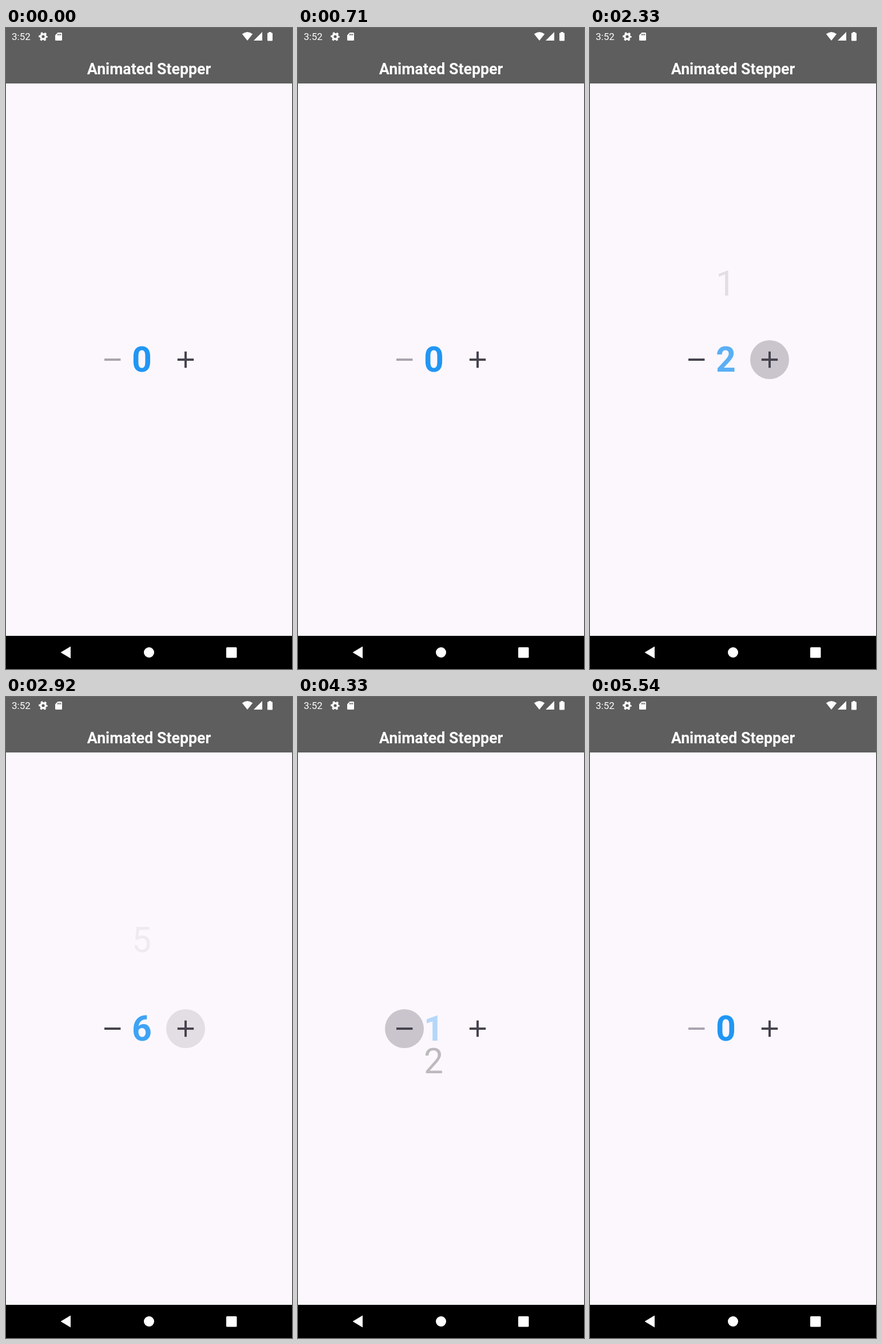
Recreate the animation shown at these times as an HTML page. Size 500x1121 px, loop 5.62 s.

```html
<!DOCTYPE html>
<html lang="en">
<head>
<meta charset="utf-8">
<title>Animated Stepper</title>
<style>
  html, body { margin: 0; width: 100%; height: 100%; overflow: hidden; background: #fcf7fd; }
  svg { display: block; font-family: Roboto, sans-serif; }
  .digit { font-size: 60.8px; }
  #next { font-weight: 700; fill: #2196f3; }
  #prev { fill: #9e9e9e; }
  .ink { fill: #49454f; opacity: 0; }
  .icon { fill: none; stroke: #47444f; stroke-width: 4; }
</style>
</head>
<body>
<svg width="500" height="1121" viewBox="0 0 500 1121">
  <rect width="500" height="1121" fill="#fcf7fd"/>
  <rect width="500" height="97" fill="#5e5e5e"/>

  <!-- status bar -->
  <g fill="#fff">
    <text x="10" y="21" font-size="17">3:52</text>
    <g fill="none" stroke="#fff">
      <circle cx="65" cy="15" r="4.3" stroke-width="3.4"/>
      <circle cx="65" cy="15" r="6.5" stroke-width="2.6" stroke-dasharray="3.4 3.407" stroke-dashoffset="1.7"/>
    </g>
    <path d="M90.5 8H96.500a1.500 1.500 0 0 1 1.500 1.500V20.500a1.500 1.500 0 0 1-1.500 1.500H87.500a1.500 1.500 0 0 1-1.500-1.500V12.500Z"/>
    <path d="M90.700 10v3M93.100 10v3M95.500 10v3" stroke="#5e5e5e" stroke-width="1.3"/>
    <path d="M422 22L412.800 10.400Q422 3.400 431.200 10.400Z"/>
    <path d="M433 22L448 7V22Z"/>
    <path d="M459.500 8.500V7H463.500V8.500H465a1 1 0 0 1 1 1V21.500a1 1 0 0 1-1 1H458a1 1 0 0 1-1-1V9.500a1 1 0 0 1 1-1Z"/>
    <text x="250" y="81" font-size="26.76" font-weight="700" text-anchor="middle">Animated Stepper</text>
  </g>

  <!-- stepper -->
  <circle id="minusInk" class="ink" cx="186" cy="580" r="34"/>
  <circle id="plusInk" class="ink" cx="314" cy="580" r="34"/>
  <path id="minus" class="icon" d="M172 580h28.400"/>
  <path class="icon" d="M299.800 580h28.400M314 565.800v28.400"/>
  <text id="next" class="digit" x="220" y="600.500">0</text>
  <text id="prev" class="digit" x="220" y="600.500"></text>

  <!-- navigation bar -->
  <rect y="1063" width="500" height="58" fill="#000"/>
  <g fill="#fff">
    <path d="M95.500 1092L113 1081.500V1102.500Z"/>
    <circle cx="250" cy="1092" r="9"/>
    <rect x="385" y="1083" width="18.500" height="18.500" rx="1.500"/>
  </g>
</svg>
<script>
  const LOOP = 5620, STEP = 143, TRAVEL = 180, TOP = 6;
  const UP = 2083, DOWN = 3713, RUN = STEP * TOP;
  const HOLD = 0.28, REST = 0.14;
  const $ = id => document.getElementById(id);
  const next = $('next'), prev = $('prev'), minus = $('minus');
  const clamp = x => Math.min(1, Math.max(0, x));
  const ramp = (t, from, to) => clamp((t - from) / (to - from));

  // Value, previous value and progress of the running step
  function stateAt(t) {
    const dir = t < DOWN ? 1 : -1;
    const base = dir > 0 ? 0 : TOP;
    const steps = (t - (dir > 0 ? UP : DOWN)) / STEP;
    if (steps < 0) return { to: base, from: base, p: 1 };
    if (steps >= TOP) return { to: TOP - base, from: base, p: 1 };
    const i = Math.floor(steps);
    return { from: base + dir * i, to: base + dir * (i + 1), p: steps - i, dir };
  }

  function plusInk(t) {
    return HOLD * ramp(t, UP - 60, UP + 70)
      - (HOLD - REST) * ramp(t, UP + 700, UP + 820)
      - REST * ramp(t, UP + 850, UP + 1050);
  }

  function minusInk(t) {
    return HOLD * ramp(t, DOWN - 60, DOWN + 70)
      - HOLD * ramp(t, DOWN + RUN - STEP, DOWN + RUN);
  }

  function draw(t) {
    const { from, to, p, dir } = stateAt(t);
    next.textContent = to;
    next.style.opacity = p;
    prev.textContent = p < 1 ? from : '';
    prev.style.opacity = 1 - p;
    prev.setAttribute('y', 600.5 - (dir || 0) * TRAVEL * p);
    minus.style.stroke = to === 0 ? '#a8a3ad' : '';
    $('plusInk').style.opacity = plusInk(t);
    $('minusInk').style.opacity = minusInk(t);
  }

  const start = performance.now();
  function tick() {
    draw((performance.now() - start) % LOOP);
    requestAnimationFrame(tick);
  }
  tick();
</script>
</body>
</html>
```
